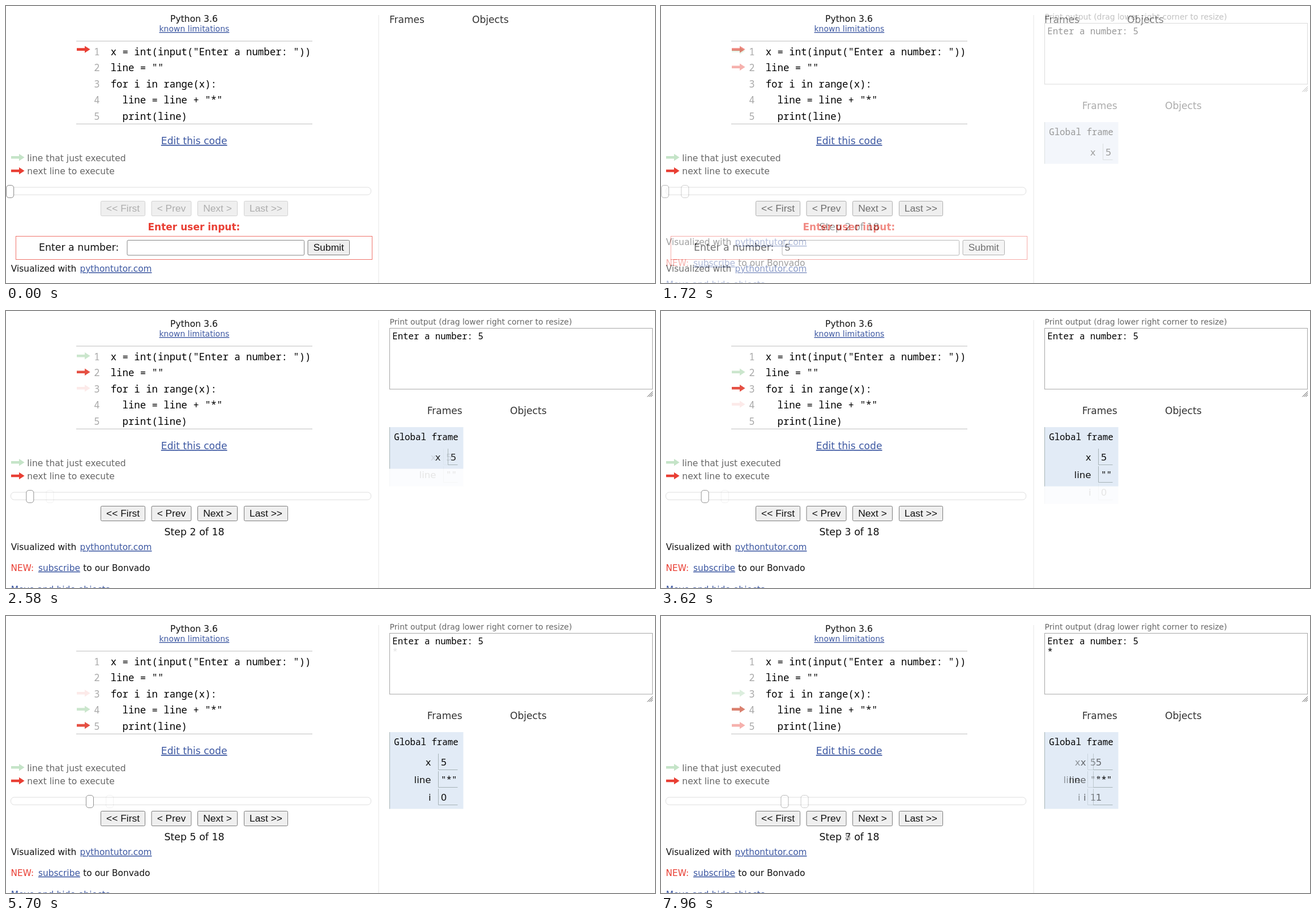
An HTML page that plays this animation: 1146x489 px, repeating every 8 s.

```html
<!DOCTYPE html>
<html lang="en">
<head>
<meta charset="utf-8">
<title>Program steps</title>
<style>
  html, body { margin: 0; width: 100%; height: 100%; overflow: hidden; background: #fff; }
  #stage { position: relative; width: 1146px; height: 489px; overflow: hidden; }
  svg { position: absolute; left: 0; top: 0; }
  text { font-family: "DejaVu Sans", Verdana, sans-serif; fill: #111; }
  .mono { font-family: "Noto Sans Mono", "DejaVu Sans Mono", monospace; fill: #000; }
  .ui { font-family: "Liberation Sans", Arial, sans-serif; }
  .link { fill: #3d58a2; text-decoration: underline; }
</style>
</head>
<body>
<div id="stage"></div>
<script>
const RED = '#e93f34', GREEN = '#c5e4c8', GREY = '#666';
const LOOP = 8000, FIRST = 500, GAP = 1040, TICK = 60, TICKS = 10;

// step: program step; next/done: marked code lines; vars: rows of the global frame
const states = [
  { step: 1, next: 1, input: '' },
  { step: 1, next: 1, input: '5' },
  { step: 2, done: 1, next: 2, vars: { x: 5 } },
  { step: 3, done: 2, next: 3, vars: { x: 5, line: '""' } },
  { step: 4, done: 3, next: 4, vars: { x: 5, line: '""', i: 0 } },
  { step: 5, done: 4, next: 5, vars: { x: 5, line: '"*"', i: 0 } },
  { step: 6, done: 5, next: 3, vars: { x: 5, line: '"*"', i: 0 }, stars: '*' },
  { step: 7, done: 3, next: 4, vars: { x: 5, line: '"*"', i: 1 }, stars: '*' },
  { step: 8, done: 4, next: 5, vars: { x: 5, line: '"**"', i: 1 }, stars: '*' }
];

const code = [
  [0, 'x = int(input("Enter a number: "))'],
  [0, 'line = ""'],
  [0, 'for i in range(x):'],
  [2, 'line = line + "*"'],
  [2, 'print(line)']
];

const text = (x, y, size, str, attrs = '') =>
  `<text x="${x}" y="${y}" font-size="${size}" ${attrs}>${String(str).replace(/</g, '&lt;')}</text>`;
const mono = (x, y, size, str, attrs = '') => text(x, y, size, str, `class="mono" ${attrs}`);
const link = (x, y, size, str) => text(x, y, size, str, 'class="link"');
const fill = color => `style="fill:${color}"`;
const rect = (x, y, w, h, back, edge = 'none', r = 0) =>
  `<rect x="${x}" y="${y}" width="${w}" height="${h}" rx="${r}" fill="${back}" stroke="${edge}"/>`;
const path = (d, color) => `<path d="${d}" fill="none" stroke="${color}"/>`;
const arrow = (x, y, color) =>
  `<path d="M${x} ${y - 2.3}h14v-3.9l9.6 6.2l-9.6 6.2v-3.9h-14z" fill="${color}"/>`;

function button(x, y, w, label, off) {
  return rect(x + .5, y + .5, w - 1, 26, '#efefef', off ? '#d2d2d2' : '#7c7c7c', 2) +
    text(x + w / 2, y + 19.3, 17.4, label, `class="ui" text-anchor="middle" ${fill(off ? '#adadad' : '#111')}`);
}

function codePanel(s) {
  const lineY = n => 79.3 + 28.45 * (n - 1);
  let out = text(290, 28, 15.6, 'Python 3.6') + link(270.5, 45, 14, 'known limitations') +
    path('M124 62H541M124 208.2H541', '#bdbdbd');
  code.forEach(([indent, str], i) => {
    const y = 86.7 + 28.45 * i;
    out += mono(155.3, y, 17.35, i + 1, fill('#aaa')) + mono(184.7 + indent * 10.41, y, 17.35, str);
  });
  if (s.done) out += arrow(125, lineY(s.done), GREEN);
  out += arrow(125, s.done ? lineY(s.next) : 76.6, RED);
  return out + link(273.8, 244, 17.15, 'Edit this code') +
    arrow(9, 267.3, GREEN) + text(37.3, 273.6, 15.55, 'line that just executed', fill(GREY)) +
    arrow(9, 291, RED) + text(37.3, 297.4, 15.55, 'next line to execute', fill(GREY));
}

function controls(s) {
  const off = !s.vars;
  return rect(8.5, 320, 636, 13.3, '#fff', '#dedede', 6) +
    rect(.7 + 35.2 * (s.step - 1), 316.5, 13, 22, '#fff', '#858585', 4.5) +
    button(167, 344, 79, '<< First', off) + button(256.5, 344, 71, '< Prev', off) +
    button(338, 344, 71, 'Next >', off) + button(420, 344, 78, 'Last >>', off);
}

const credit = y => text(8.8, y, 15.45, 'Visualized with') + link(130.5, y, 15.3, 'pythontutor.com');

function inputPanel(s) {
  return text(250.5, 396, 17, 'Enter user input:', `font-weight="bold" ${fill(RED)}`) +
    rect(17.5, 406.5, 629, 41, '#fff', '#f0746c') +
    text(58, 432, 17.35, 'Enter a number:') +
    rect(214, 413.5, 312.5, 26.5, '#fff', '#858585', 2) +
    text(218.6, 432.3, 17.4, s.input, 'class="ui"') +
    button(532.5, 413, 74.5, 'Submit') + credit(469) +
    text(677, 29.5, 17.05, 'Frames', fill('#333')) + text(823, 29.5, 17.1, 'Objects', fill('#333'));
}

function stepNotes(s) {
  return text(332.5, 396, 17.4, `Step ${s.step} of 18`, 'text-anchor="middle"') + credit(422) +
    text(8.6, 458.8, 15.3, 'NEW:', fill(RED)) + link(57, 458.8, 15.4, 'subscribe') +
    text(136.3, 458.8, 15.4, 'to our Bonvado') + link(8.8, 496.6, 15.5, 'Move and hide objects');
}

function memory(s) {
  const vars = Object.entries(s.vars);
  let out = text(677.5, 23.8, 13.92, 'Print output (drag lower right corner to resize)', fill(GREY)) +
    rect(677.5, 30.5, 464, 107.5, '#fff', '#a6a6a6') +
    mono(682.2, 50.4, 15.78, 'Enter a number: 5') + mono(682.2, 69.4, 15.78, s.stars || '') +
    path('M1132.5 151.5l9.5 -9.5M1135.5 151.5l6.5 -6.5M1138.5 151.5l3.5 -3.5', '#555') +
    text(743.7, 181.6, 17.05, 'Frames', fill('#333')) + text(890, 181.6, 17.1, 'Objects', fill('#333')) +
    rect(677, 205, 130.5, 42.5 + 31 * vars.length, '#e2ebf6') +
    path(`M677.5 205v${42.5 + 31 * vars.length}`, '#a6b3b6') +
    mono(685.2, 228.4, 15.78, 'Global frame');
  const left = s.vars.line ? Math.round(791 - 9.45 * s.vars.line.length) + .5 : 780.5;
  vars.forEach(([name, value], i) => {
    const y = 264 + 31 * i;
    out += path(`M${left} ${y - 21}v28.5H797.5`, '#a6b3b6') +
      text(left - 13, y, 16.6, name, 'text-anchor="end"') +
      (name === 'line' ? mono(left + 4.6, y, 15.78, value) : text(left + 4.3, y, 16.6, value));
  });
  return out;
}

function draw(s) {
  return '<svg width="1146" height="489">' + rect(0, 0, 1146, 489, '#fff') +
    path('M658 16V489', '#e6e6e6') + codePanel(s) + controls(s) +
    (s.vars ? stepNotes(s) + memory(s) : inputPanel(s)) + '</svg>';
}

const stage = document.getElementById('stage');
stage.innerHTML = states.map(draw).join('');
const layers = [...stage.children];

// Each layer fades in over the previous one in ten equal steps.
function blend(i, t) {
  if (!i) return 1;
  const step = Math.floor((t - FIRST - GAP * (i - 1)) / TICK) + 1;
  return Math.max(0, Math.min(1, step / TICKS));
}

function frame() {
  const t = performance.now() % LOOP;
  layers.forEach((layer, i) => {
    const a = blend(i, t);
    const covered = i + 1 < layers.length && blend(i + 1, t) === 1;
    layer.style.opacity = a;
    layer.style.visibility = a && !covered ? 'visible' : 'hidden';
  });
  requestAnimationFrame(frame);
}
frame();
</script>
</body>
</html>
```
